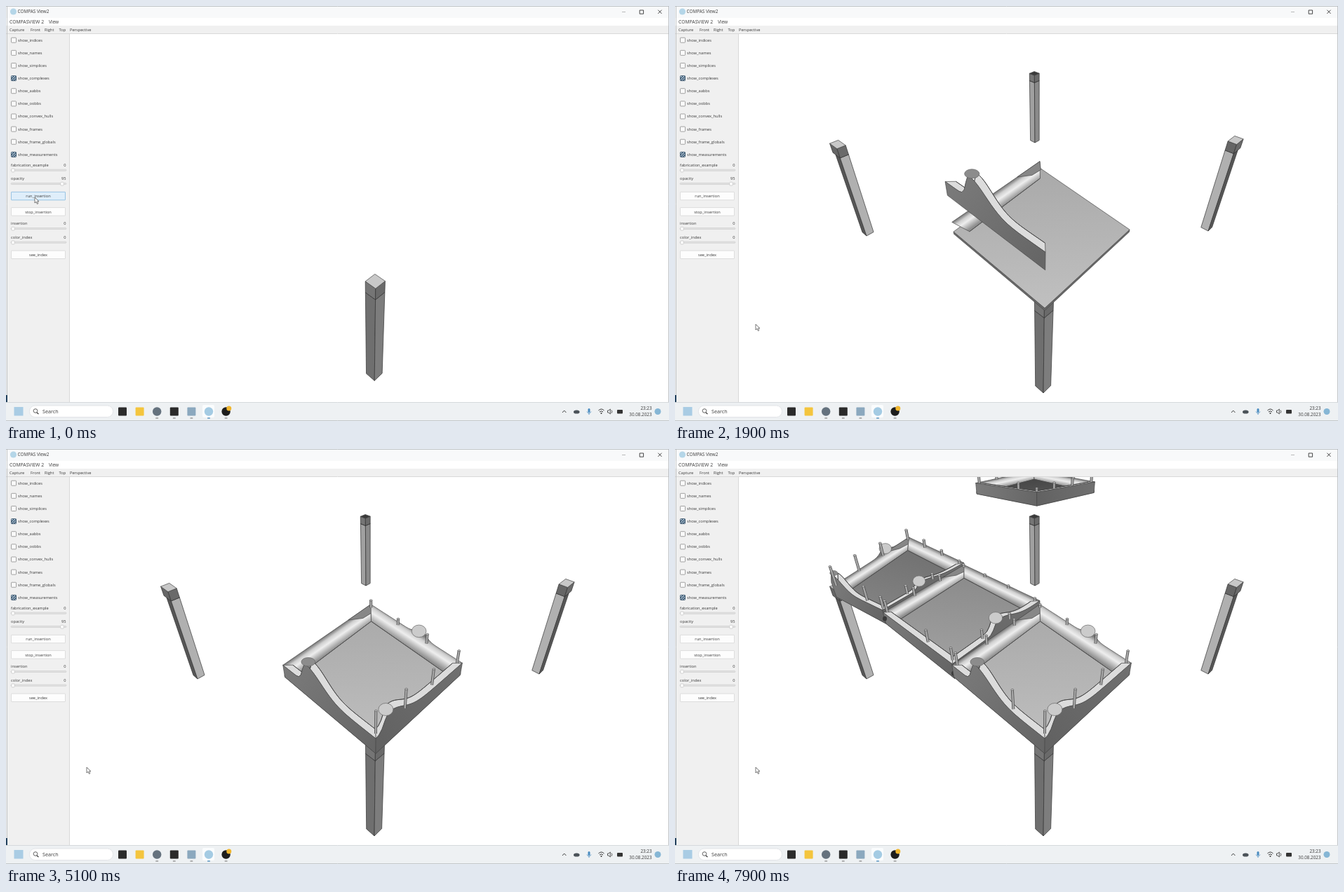
These frames come from a looping animation (945x592 px, 8000 ms). An HTML page with a canvas:

```html
<!DOCTYPE html>
<html lang="en">
<head>
<meta charset="utf-8">
<title>Assembly viewer</title>
<style>
html, body { margin: 0; width: 100%; height: 100%; overflow: hidden; background: #fff; }
#stage { position: relative; width: 945px; height: 592px; overflow: hidden; }
canvas, svg { position: absolute; left: 0; top: 0; }
span { position: absolute; white-space: pre; line-height: 10px; color: #3c3c3c; font-family: "Open Sans", "Noto Sans", sans-serif; }
</style>
</head>
<body>
<div id="stage">
  <canvas id="view" width="945" height="592"></canvas>
  <div id="labels"></div>
  <svg id="arrow" width="10" height="12"><path d="M1 1V9L3 7.3L4.4 10.4L5.8 9.8L4.5 6.8H7Z" fill="#fff" stroke="#555" stroke-width=".8"/></svg>
  <svg id="resize" width="10" height="8"><path d="M1 4L3 2V6ZM8 4L6 2V6ZM3 4H6" fill="#fff" stroke="#777" stroke-width=".7"/></svg>
</div>
<script>
const ctx = document.getElementById('view').getContext('2d');
const labels = document.getElementById('labels');
const arrow = document.getElementById('arrow');
const resize = document.getElementById('resize');
const LOOP = 8000, STEP = 100, FALL = 350;
const VX = 519, VY = 1055; // vanishing point of the vertical direction

// ---------- interface ----------
function label(text, x, y, size = 5.7, align = 'left') {
  const s = document.createElement('span');
  s.textContent = text;
  s.style.cssText = `left:${x}px;top:${y - 5}px;font-size:${size}px`;
  if (align === 'right') s.style.transform = 'translateX(-100%)';
  if (align === 'center') s.style.transform = 'translateX(-50%)';
  labels.append(s);
}

const checks = ['indices', 'names', 'simplices', 'complexes', 'aabbs', 'oobbs', 'convex_hulls', 'frames', 'frame_globals', 'measurements'];
const sliders = [['fabrication_example', 227, 0], ['opacity', 246.3, 95], ['insertion', 310.3, 0], ['color_index', 330, 0]];
const buttons = [['run_insertion', 271.3], ['stop_insertion', 293.6], ['see_index', 355]];
const checkY = i => 48.7 + 18.13 * i;

label('COMPAS View2', 16.5, 8.2, 6.4);
label('COMPASVIEW 2', 5, 22.7, 6.8);
label('View', 61, 22.7, 6.5);
[['Capture', 5], ['Front', 35], ['Right', 55], ['Top', 75.5], ['Perspective', 91]].forEach(([s, x]) => label(s, x, 33.7));
checks.forEach((s, i) => label('show_' + s, 17, checkY(i)));
sliders.forEach(([s, y, v]) => { label(s, 7, y); label(v, 85.5, y, 5.7, 'right'); });
buttons.forEach(([s, y]) => label(s, 46, y, 5.7, 'center'));
label('Search', 52, 578.3, 7.2);
label('23:23', 920.5, 574, 6.3, 'right');
label('30.08.2023', 920.5, 582.6, 6.3, 'right');

function box(x, y, w, h, fill, stroke, r = 0) {
  ctx.beginPath();
  ctx.roundRect(x, y, w, h, r);
  if (fill) { ctx.fillStyle = fill; ctx.fill(); }
  if (stroke) { ctx.strokeStyle = stroke; ctx.lineWidth = .8; ctx.stroke(); }
}
function disc(x, y, r, fill, ry = r, stroke) {
  ctx.beginPath();
  ctx.ellipse(x, y, r, ry, 0, 0, 7);
  ctx.fillStyle = fill;
  ctx.fill();
  if (stroke) { ctx.strokeStyle = stroke; ctx.lineWidth = .7; ctx.stroke(); }
}
function lines(path, color, w = 1) {
  ctx.strokeStyle = color;
  ctx.lineWidth = w;
  ctx.stroke(new Path2D(path));
}

function drawWindow(hover) {
  box(0, 0, 945, 17, '#f8f9fa');
  box(0, 17, 945, 11, '#fff');
  box(0, 28, 945, 11, '#f0f0f0');
  box(0, 39, 90, 526, '#f0f0f0');
  lines('M0 39.5H945M90.5 39V565', '#d9d9d9');
  lines('M1.5 0V565M944.5 0V565M0 .5H945', '#b4b8bb', .8);
  box(0, 555, 2, 10, '#24435f');
  disc(10.5, 8, 4.6, '#b5d6e8');
  lines('M878 8.5H883', '#aaa', .8);
  lines('M903.2 6H908.6V11.2H903.2ZM929.4 5.7L934.6 10.9M934.6 5.7L929.4 10.9', '#333', .9);

  checks.forEach((_, i) => {
    const y = checkY(i) - 3.5, on = i === 3 || i === 9;
    box(7.5, y, 7, 7, on ? '#c3d7e8' : '#fbfbfb', on ? '#1f3c55' : '#8b8b8b', .8);
    if (on) lines(`M8 ${y + 4}L11 ${y + .5}M8.5 ${y + 6.5}L14 ${y + 1}M11.5 ${y + 6.5}L14 ${y + 4}`, '#1f3c55', 1.1);
  });
  sliders.forEach(([, y, v]) => {
    box(7, y + 6.2, 79, 2, '#e4e4e4', '#d0d0d0', 1);
    box(7.8 + v * .737, y + 5, 4.4, 4.8, '#fff', '#c8c8c8', 1);
  });
  buttons.forEach(([, y], i) => {
    const lit = hover && !i;
    box(7.5, y - 6, 77, 11.5, lit ? '#dfeefa' : '#fdfdfd', lit ? '#84b9e0' : '#d6d6d6', .5);
  });
}

function drawTaskbar() {
  box(0, 565, 945, 27, '#eef1f3');
  lines('M0 565.5H945', '#d5d9dc');
  lines('M0 591.5H945', '#c3c7ca');
  box(11.5, 572, 13, 12.5, '#a9cce4');
  box(33.5, 570, 119, 16.5, '#fff', '#dcdfe2', 8);
  disc(42, 577.5, 2.8, '#fff', 2.8, '#222');
  lines('M44 579.8L46.4 582.2', '#222', 1.2);
  box(280, 569, 17, 18, '#fafcfd', null, 2);
  ['#2b2b2b', '#f4c53d', '#65727e', '#2a2a2a', '#8ba8be', '#a4cbe3', '#1d1d1d'].forEach((c, i) => {
    const x = 166 + 24.6 * i;
    if (i === 2 || i > 4) disc(x, 578.5, 6.2, c);
    else box(x - 6, 572.5, 12, 12, c, null, 1);
    if (i > 1) box(x - 2, 587.3, 4, 1.2, i === 5 ? '#3c83b8' : '#888', null, .6);
  });
  disc(317.8, 574, 3.5, '#efb62f');
  lines('M793 580L795.7 577L798.4 580', '#333', .9);
  disc(813.3, 579, 4.3, '#4b5359', 2.6);
  box(829.5, 574, 3, 6, '#4a8cc0', null, 1.5);
  lines('M828 578.5Q831 584 834 578.5M831 581V583', '#4a8cc0', .8);
  lines('M844.5 577Q848.5 573 852.5 577M846 579Q848.5 576.7 851 579', '#333', 1);
  disc(848.5, 581, 1, '#333');
  lines('M857.5 577H859L861.3 575V582L859 580H857.5ZM863 576.5Q864.8 578.5 863 580.8', '#333', .8);
  box(871, 576, 8, 5.5, '#333', null, 1);
  disc(929, 578.5, 4.5, '#86b6d5');
}

// ---------- perspective ----------
// Maps the unit square to a quad given as front, left, back, right.
function plane([[x0, y0], [x1, y1], [x2, y2], [x3, y3]]) {
  const ax = x1 - x2, bx = x3 - x2, sx = x0 - x1 + x2 - x3;
  const ay = y1 - y2, by = y3 - y2, sy = y0 - y1 + y2 - y3;
  const d = ax * by - bx * ay, g = (sx * by - bx * sy) / d, h = (ax * sy - sx * ay) / d;
  return (u, v) => {
    const w = 1 + g * u + h * v;
    return [(x0 + (x1 - x0 + g * x1) * u + (x3 - x0 + h * x3) * v) / w,
      (y0 + (y1 - y0 + g * y1) * u + (y3 - y0 + h * y3) * v) / w];
  };
}
// Adds height to a plane; k0 and k1 give the perspective gain along y.
function space(quad, k0, k1, z = 0) {
  const flat = plane(quad);
  return (u, v, h) => {
    const [x, y] = flat(u, v), s = 1 / (1 - (h + z) * (k0 + k1 * y));
    return [VX + (x - VX) * s, VY + (y - VY) * s];
  };
}
const moduleSpace = (m, z) => space(m.quad, .085, .000446, z);

function poly(pts, fill, line = '#484848', w = .7) {
  ctx.beginPath();
  pts.forEach(p => ctx.lineTo(...p));
  ctx.closePath();
  ctx.fillStyle = fill;
  ctx.fill();
  if (line) { ctx.strokeStyle = line; ctx.lineWidth = w; ctx.lineJoin = 'round'; ctx.stroke(); }
}
function stroke(pts, color, w) {
  ctx.beginPath();
  pts.forEach(p => ctx.lineTo(...p));
  ctx.strokeStyle = color;
  ctx.lineWidth = w;
  ctx.stroke();
}
function blend(a, b, colors) {
  const g = ctx.createLinearGradient(...a, ...b);
  colors.forEach((c, i) => g.addColorStop(i / (colors.length - 1), c));
  return g;
}

// ---------- table modules ----------
// humps: [place along the rail, height] per side: front left, front right, back right, back left
const front = { col: 0, row: 0, quad: [[527, 431], [397, 322], [520, 231], [648, 319]], tones: ['#a9a9a9', '#c0c0c0'],
  humps: [[.71, .16], [.13, .12], [.43, .06]] };
const mid = { col: 1, row: 0, quad: [[398, 324], [300, 246], [413, 174], [520, 229]], tones: ['#8a8a8a', '#a3a3a3'],
  humps: [, [.5, .09]] };
const far = { col: 2, row: 0, quad: [[300, 246], [229, 208], [335, 134], [413, 174]], tones: ['#707070', '#858585'],
  humps: [[.93, .12], [.5, .05], , [.7, .05]] };
const corner = { col: 2, row: 2, quad: [[516, 150], [436, 130], [512, 104], [592, 128]], tones: ['#444', '#5c5c5c'], humps: [] };

const rim = (u, v) => .1 - .02 * (u + v);
const side = (i, t, inset) => [[t, inset], [inset, t], [t, 1 - inset], [1 - inset, t]][i];
const steps = Array.from({ length: 33 }, (_, i) => i / 32);

function panel(at, m) {
  const [f, l, b, r] = [at(0, 0, 0), at(1, 0, 0), at(1, 1, 0), at(0, 1, 0)];
  poly([l, f, r, at(0, 1, -.02), at(0, 0, -.02), at(1, 0, -.02)], '#686868');
  poly([f, l, b, r], blend(b, f, m.tones));
}

function rail(at, m, i) {
  const back = i > 1, [peak, rise] = m.humps[i] || [0, 0];
  const height = t => {
    const d = t - peak, long = (d < 0) === (peak > .5);
    return rim(...side(i, t, 0)) + rise * Math.exp(-((d / (back ? .07 : long ? .22 : .06)) ** 2));
  };
  const run = (inset, h) => steps.map(t => at(...side(i, inset + (1 - 2 * inset) * t, inset), h(t)));
  const top = run(0, height);
  const inner = back ? run(.09, () => 0) : run(.055, height);
  const foot = run(0, () => -.02).reverse();

  if (back) {
    // shade across the rail, at right angles to its length
    const [p, q] = [top[16], inner[16]], dx = top[32][0] - top[0][0], dy = top[32][1] - top[0][1];
    const f = ((q[1] - p[1]) * dx - (q[0] - p[0]) * dy) / (dx * dx + dy * dy);
    poly([...top, ...inner.slice().reverse()], blend(p, [p[0] - dy * f, p[1] + dx * f], ['#757575', '#cfcfcf', '#eee', '#bdbdbd', '#8e8e8e']));
    stroke(inner, '#4c4c4c', .9);
    if (i === 3) poly([at(1, .72, rim(1, .72)), at(1, 1, rim(1, 1)), at(.95, .96, .03), at(.94, .84, .05)], '#878787');
  } else {
    poly([...top, ...inner.slice().reverse()], '#dcdcdc');
    stroke(inner, '#404040', .9);
    poly([...top, ...foot], blend(top[0], top[32], i ? ['#626262', '#707070'] : ['#666', '#7b7b7b']));
  }
  if (rise) {
    const [x, y] = at(...side(i, peak, .03), height(peak));
    const r = Math.abs(at(...side(i, peak + .08, 0), 0)[0] - at(...side(i, peak - .08, 0), 0)[0]) / 2;
    disc(x, y, r, i ? '#cbcbcb' : '#8c8c8c', r * (i ? .85 : .62), '#666');
  }
}

// Twelve places round the rim, starting at the front and going right.
function peg(at, m, i, z = 0) {
  const f = .03 + .313 * (i % 3), n = Math.floor(i / 3);
  const [u, v] = side([1, 2, 3, 0][n], n > 1 ? 1 - f : f, .03);
  const edge = x => Math.min(x, 3 - x, 1);
  const low = rim(u, v), top = low + .175 - .075 * (edge(m.col + u) + edge(m.row + v));
  const a = at(u, v, top + z), b = at(u, v, Math.max(low, top + z - .22));
  stroke([a, b], '#4c4c4c', 4);
  stroke([a, b], '#a5a5a5', 2.5);
  disc(...a, 1.9, '#d0d0d0', 1.1, '#555');
}
const pegOrder = [0, 1, 2, 3, 4, 5, 6, 7, 8, 9, 11];

function drawModule(m, z) {
  const at = moduleSpace(m, z);
  panel(at, m);
  [3, 2, 0, 1].forEach(i => rail(at, m, i));
  pegOrder.forEach(i => peg(at, m, i));
}

// ---------- legs ----------
const floor = [[525, 552], [273, 328], [513, 195], [760, 321]];
const legs = [[0, 0, '#6f6f6f', '#7d7d7d'], [1, 0, '#565656', '#b0b0b0'], [1, 1, '#a0a0a0', '#8a8a8a'], [0, 1, '#b0b0b0', '#565656']];

function leg([u, v, left, right], z) {
  const at = space(floor, .0539, .00029, z), s = .033, lone = u !== v;
  const block = (u1, v1, h0, h1, a, b) => {
    poly([at(u, v, h0), at(u1, v, h0), at(u1, v, h1), at(u, v, h1)], a, '#333');
    poly([at(u, v, h0), at(u, v1, h0), at(u, v1, h1), at(u, v, h1)], b, '#333');
    poly([at(u, v, h1), at(u1, v, h1), at(u1, v1, h1), at(u, v1, h1)], u && v ? '#3a3a3a' : '#c8c8c8', '#444');
  };
  const h = lone ? .89 : .82;
  block(u + s, v + s, 0, h, left, right);
  block(u + s + (lone && u ? .02 : 0), v + s + (lone && v ? .02 : 0), h, h + .09, lone ? '#666' : '#757575', '#6a6a6a');
}

// ---------- sequence ----------
// Piecewise linear through [x, y, ...] keys.
function along(keys, x) {
  const i = Math.max(1, keys.findIndex(k => k[0] >= x)), a = keys[i - 1], b = keys[i];
  const f = (x - a[0]) / (b[0] - a[0]);
  return a.slice(1).map((p, j) => p + (b[j + 1] - p) * f);
}
// landing time of the n-th part
const landing = n => along([[0, 110], [3, 1147], [12, 4055], [19, 6550], [21, 7190], [24, 8240]], n)[0];

function drop(t, n, draw) {
  const left = landing(n) - t;
  if (left <= FALL) draw(Math.max(0, left / (2 * FALL)));
}

function drawModel(t) {
  drop(t, 24, z => drawModule(corner, z));
  [2, 1, 3, 0].forEach(i => drop(t, i, z => leg(legs[i], z)));
  drop(t, 20, z => drawModule(far, z));
  drop(t, 21, z => drawModule(mid, z));
  [far, mid].forEach((m, i) => {
    const [x, y] = m.quad[0];
    if (t >= landing(22 + i)) disc(x - 1, y - 4, 3, '#3a3a3a', 3.5);
  });

  drop(t, 4, z => panel(moduleSpace(front, z), front));
  // back left, back right, front left, front right
  [[3, 5], [2, 8], [0, 6], [1, 7]].forEach(([i, n]) => drop(t, n, z => rail(moduleSpace(front, z), front, i)));
  pegOrder.forEach((p, i) => drop(t, 9 + i, z => peg(moduleSpace(front, 0), front, p, z)));
}

// ---------- pointer ----------
const track = [[0, 40, 272], [200, 40, 272], [1000, 0, 480], [1200, 0, 480], [1800, 114, 453], [LOOP, 114, 453]];
function movePointer(t) {
  const [x, y] = along(track, t), edge = t >= 1000 && t <= 1200;
  arrow.style.display = edge ? 'none' : '';
  resize.style.display = edge ? '' : 'none';
  (edge ? resize : arrow).style.transform = `translate(${x}px, ${y}px)`;
}

function frame(now) {
  const t = Math.floor(now % LOOP / STEP) * STEP;
  box(0, 0, 945, 592, '#fff');
  ctx.save();
  ctx.beginPath();
  ctx.rect(91, 40, 853, 525);
  ctx.clip();
  drawModel(t);
  ctx.restore();
  drawWindow(t < 300);
  drawTaskbar();
  movePointer(t);
  requestAnimationFrame(frame);
}
frame(0);
</script>
</body>
</html>
```
